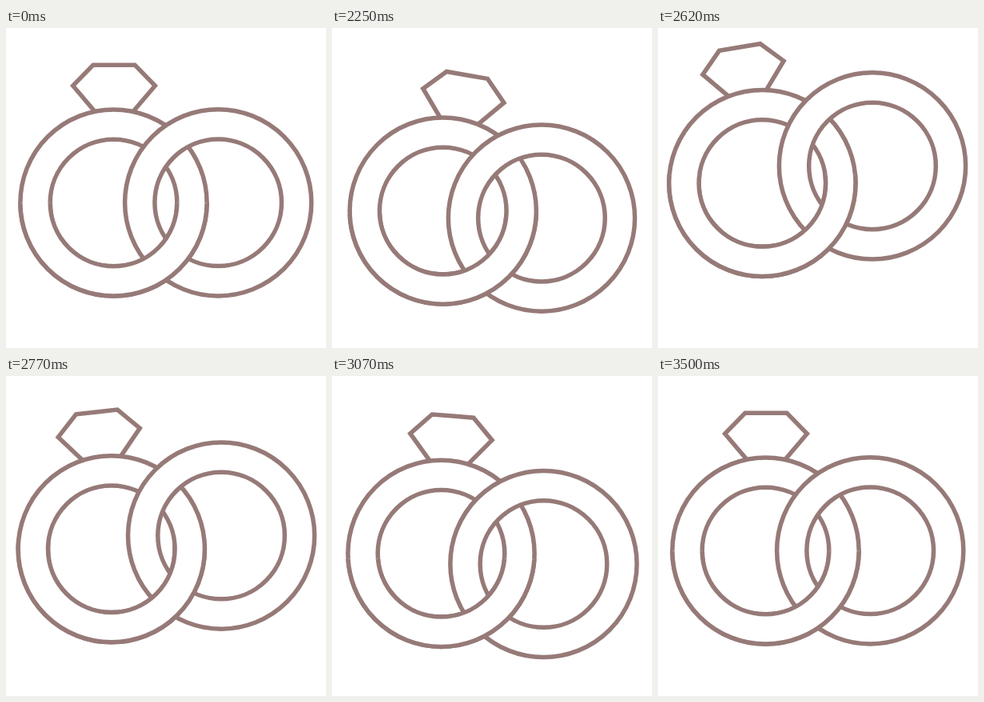
Recreate the animation shown at these times as an HTML page with a canvas. Size 400 by 400 pixels, loop 3.52 s.

```html
<!DOCTYPE html>
<html lang="en">
<head>
<meta charset="utf-8">
<title>Wedding rings</title>
<style>
  html, body { margin: 0; width: 100%; height: 100%; overflow: hidden; background: #fff; }
  canvas { display: block; width: 400px; height: 400px; }
</style>
</head>
<body>
<canvas id="stage" width="400" height="400"></canvas>
<script>
const ctx = document.getElementById('stage').getContext('2d');
const LOOP = 3520, REST = 2020, START = 1970;
const OUTER = 116.6, INNER = 79.3;
const HOP_BEATS = [250, 495, 925, 1300];
const SWAY_BEATS = [240, 630, 1140, 1410];

// Swings from rest through each peak and back to rest, with sine easing.
function swing(t, beats, peaks) {
  const i = beats.findIndex(beat => t < beat);
  if (t <= 0 || i < 0) return 0;
  const t0 = beats[i - 1] || 0, from = peaks[i - 1] || 0, to = peaks[i] || 0;
  return from + (to - from) * (1 - Math.cos(Math.PI * (t - t0) / (beats[i] - t0))) / 2;
}

const sway = t => swing(t, SWAY_BEATS, [10.2, -9.6, 5]);
const hop = (t, ...peaks) => swing(t, HOP_BEATS, peaks);

function ring(x, y) {
  ctx.beginPath();
  for (const r of [OUTER, INNER]) {
    ctx.moveTo(x + r, y);
    ctx.arc(x, y, r, 0, Math.PI * 2);
  }
  ctx.fill('evenodd');
  ctx.stroke();
}

function diamond(x, y, degrees) {
  ctx.save();
  ctx.translate(x, y);
  ctx.rotate(degrees * Math.PI / 180);
  ctx.translate(0.5, 0);
  ctx.beginPath();
  for (const side of [-1, 1]) {
    ctx.moveTo(side * 23, -113);
    ctx.lineTo(side * 51.3, -146.3);
    ctx.lineTo(side * 26, -172.3);
    ctx.lineTo(0, -172.3);
  }
  ctx.stroke();
  ctx.restore();
}

function draw(time) {
  const t = time < REST ? 0 : time - START;
  const angle = sway(t - 10);
  const ax = 134.5 + 0.43 * angle;
  const ay = 218.5 + hop(t, 12, -37, 6);
  // The plain ring follows later, mirrored and higher.
  const bx = 265.2 - 0.42 * sway(t - 120);
  const by = 218.3 + hop(t / 1.14, 19.3, -51, 17.2);

  ctx.fillStyle = '#fff';
  ctx.fillRect(0, 0, 400, 400);
  ctx.strokeStyle = '#967a78';
  ctx.lineWidth = 5.5;
  diamond(ax, ay, angle);
  ring(ax, ay);
  ring(bx, by);

  // The lower half of the diamond ring passes in front.
  ctx.save();
  ctx.beginPath();
  ctx.rect(0, (ay + by) / 2, 400, 400);
  ctx.clip();
  ring(ax, ay);
  ctx.restore();
}

const begin = performance.now();
function tick() {
  draw((performance.now() - begin) % LOOP);
  requestAnimationFrame(tick);
}
tick();
</script>
</body>
</html>
```
